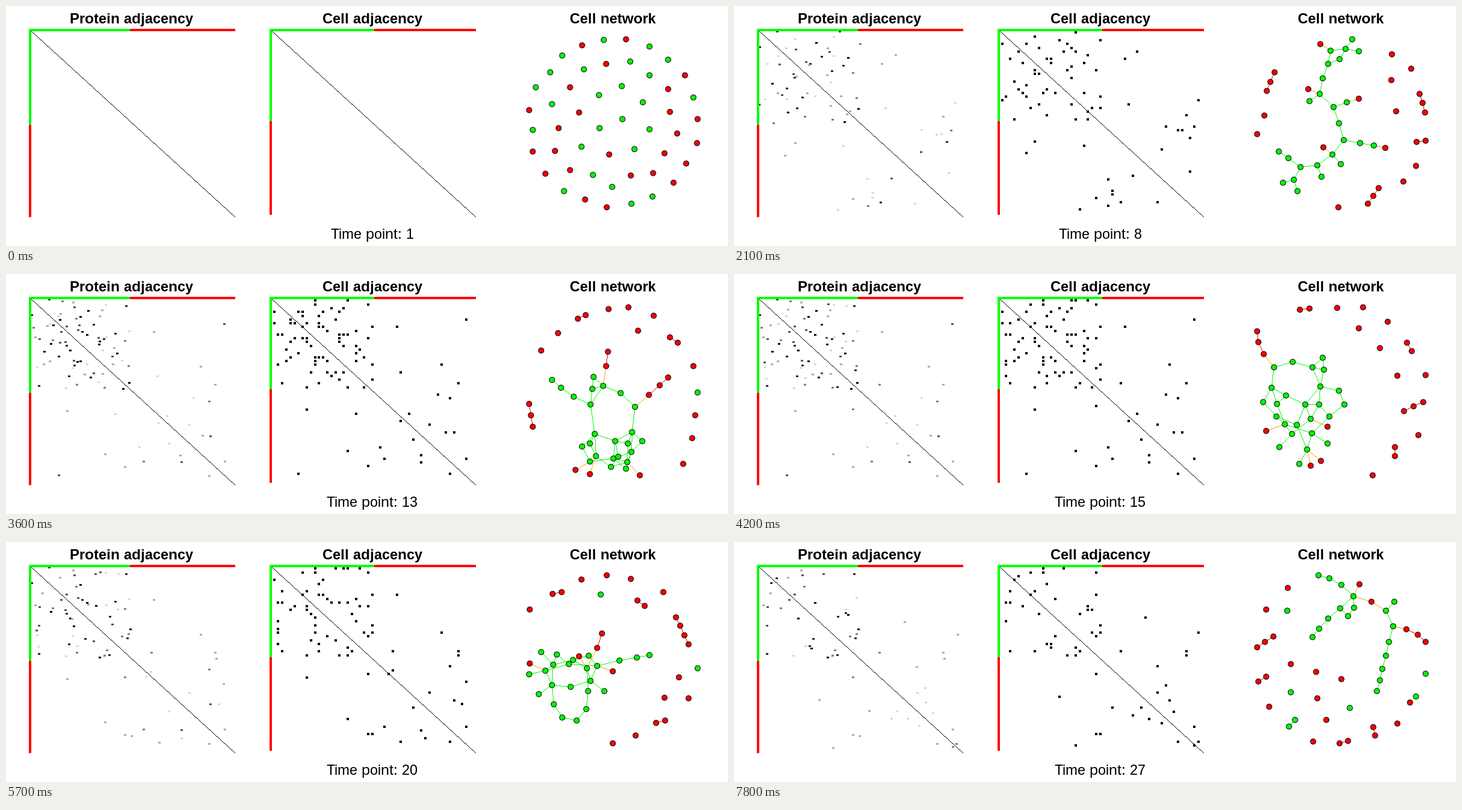
Recreate the animation shown at these times as a matplotlib script. Size 1200 px wide and 400 px high, loop 8 s.

```python
import numpy as np
import matplotlib.pyplot as plt
from matplotlib.animation import FuncAnimation
from matplotlib.collections import PolyCollection
from matplotlib.patches import Rectangle

W, H, DPI = 1200, 400, 100
PX = 72 / DPI                      # points per pixel
N, GREENS, STEPS = 50, 25, 27
TICK, HOLD = 100, 3                # each time point holds for three ticks
GREEN, RED, ORANGE = "#00ff00", "#ff0000", "#ffa500"
TINT = {"gg": GREEN, "gr": ORANGE, "rr": RED}

plt.rcParams.update({"font.family": "Liberation Sans",
                     "text.hinting": "default", "text.hinting_factor": 1})
rng = np.random.default_rng(11)


def targets(step):
    """Contacts of each kind: a quick rise, a plateau, a slow decline."""
    return {"gg": round(min(3.6 * step, 36, 57 - 1.5 * step)),
            "gr": min(step, 5),
            "rr": min(int(1.5 * step), 7)}


def kind_of(edge):
    return "".join("g" if c < GREENS else "r" for c in edge)


def draw_cell(side):
    return int(rng.integers(0, GREENS)) + (GREENS if side == "r" else 0)


def allowed(kind, di, dj):
    """Green cells cluster; red cells stay in pairs, threes or as leaves."""
    if kind == "gg":
        return max(di, dj) < 5
    if kind == "gr":
        return di < 5 and dj < 2
    return di + dj < 2


def grow(edges, step):
    """Drop some contacts, then add new ones up to the target counts."""
    edges = {e: v for e, v in edges.items() if rng.random() > .12}
    for kind, want in targets(step).items():
        have = [e for e in edges if kind_of(e) == kind]
        for e in have[want:]:
            del edges[e]
        missing = want - len(have)
        while missing > 0:
            i, j = sorted(draw_cell(s) for s in kind)
            degree = np.bincount(np.ravel(list(edges)).astype(int), minlength=N)
            if i == j or (i, j) in edges or not allowed(kind, degree[i], degree[j]):
                continue
            level = int(6 * rng.random() ** (1.3 if kind == "gg" else .4))
            edges[i, j] = (rng.random(), rng.random(), str(round(.17 * level, 2)))
            missing -= 1
    return edges


def spring_layout(edges, rounds=400, pull=4.0):
    """Fruchterman-Reingold with a cooling step, fitted to the panel."""
    k, reach = np.sqrt(N), N ** 3
    adj = np.zeros((N, N))
    for i, j in edges:
        adj[i, j] = adj[j, i] = pull
    pos = rng.normal(0, N / 3, (N, 2))
    for r in range(rounds):
        diff = pos[:, None] - pos[None]
        dist = np.hypot(diff[..., 0], diff[..., 1]) + 1e-6
        force = N * (1 / dist - dist ** 2 / reach) - adj * dist ** 2 / k
        move = (diff * (force / dist)[..., None]).sum(1)
        size = np.hypot(*move.T) + 1e-9
        limit = N * (1 - r / rounds) ** 1.5
        pos += move * np.minimum(1, limit / size)[:, None]
    low, high = pos.min(0), pos.max(0)
    return np.round((869, 55) + (pos - low) / (high - low) * 280)


def boxes(points, w, h):
    """Pixel-aligned rectangles centred on the points."""
    quads = []
    for x, y in points:
        x, y = round(x - w / 2), round(y - h / 2)
        quads.append([(x, y), (x + w, y), (x + w, y + h), (x, y + h)])
    return quads


def pixel_line(a, b):
    """A hard one-pixel line as a run of unit squares."""
    count = int(np.abs(np.subtract(b, a)).max()) + 1
    return boxes(np.round(np.linspace(a, b, count)) + .5, 1, 1)


def make_scenes():
    edges, scenes = {}, []
    for step in range(STEPS):
        edges = grow(edges, step)
        nodes = spring_layout(edges)
        cells, proteins, shades, links, tints = [], [], [], [], []
        for (i, j), (u, v, shade) in edges.items():
            line = pixel_line(nodes[i], nodes[j])
            links += line
            tints += [TINT[kind_of((i, j))]] * len(line)
            p, q = (i + u) / N, (j + v) / N
            for a, b in ((p, q), (q, p)):
                proteins.append((41.5 + 338 * a, 41.5 + 309 * b))
                shades.append(shade)
            for a, b in ((i, j), (j, i)):
                if b:              # the first row lies under the bar
                    cells.append((445.5 + 6.8 * a, 38.2 + 6.27 * b))
        scenes.append(dict(nodes=nodes, links=links, tints=tints,
                           cells=boxes(cells, 4, 4),
                           proteins=boxes(proteins, 4, 3), shades=shades))
    return scenes


SCENES = make_scenes()

fig = plt.figure(figsize=(W / DPI, H / DPI), dpi=DPI, facecolor="white")
ax = fig.add_axes([0, 0, 1, 1])
ax.set_xlim(0, W)
ax.set_ylim(H, 0)
ax.axis("off")


def squares(verts=(), color="black"):
    return ax.add_collection(PolyCollection(verts, facecolors=color,
                                            linewidths=0, zorder=2))


def bar(x0, y0, x1, y1, color):
    ax.add_patch(Rectangle((x0, y0), x1 - x0, y1 - y0, color=color, lw=0,
                           zorder=4))


def matrix(left, split_x, split_y, bottom):
    right = left + 343
    bar(left, 38, split_x, 42, GREEN)
    bar(split_x, 38, right, 42, RED)
    bar(left, 38, left + 4, split_y, GREEN)
    bar(left, split_y, left + 4, bottom, RED)
    squares(pixel_line((left + 2, 40), (right - 1, 351)))


def label(x, y, text, weight="normal"):
    return ax.text(x, y, text, size=24 * PX, weight=weight,
                   ha="center", va="baseline")


matrix(38, 206, 198, 352)
matrix(438, 612, 192, 348)
for x, title in ((208.5, "Protein adjacency"), (608.5, "Cell adjacency"),
                 (1008.5, "Cell network")):
    label(x, 29, title, "bold")
clock = label(608.5, 388, "")

protein_dots, cell_dots, links = squares(), squares(), squares()
nodes = ax.scatter(np.zeros(N), np.zeros(N), s=(9 * PX) ** 2,
                   c=[GREEN] * GREENS + [RED] * (N - GREENS),
                   edgecolors="black", linewidths=PX, zorder=5)


def update(frame):
    step = frame // HOLD
    scene = SCENES[step]
    protein_dots.set_verts(scene["proteins"])
    protein_dots.set_facecolor(scene["shades"])
    cell_dots.set_verts(scene["cells"])
    links.set_verts(scene["links"])
    links.set_facecolor(scene["tints"])
    nodes.set_offsets(scene["nodes"] + .5)
    clock.set_text(f"Time point: {step + 1}")
    return protein_dots, cell_dots, links, nodes, clock


anim = FuncAnimation(fig, update, frames=80, interval=TICK, repeat=True,
                     repeat_delay=0, blit=False)
plt.show()
```
